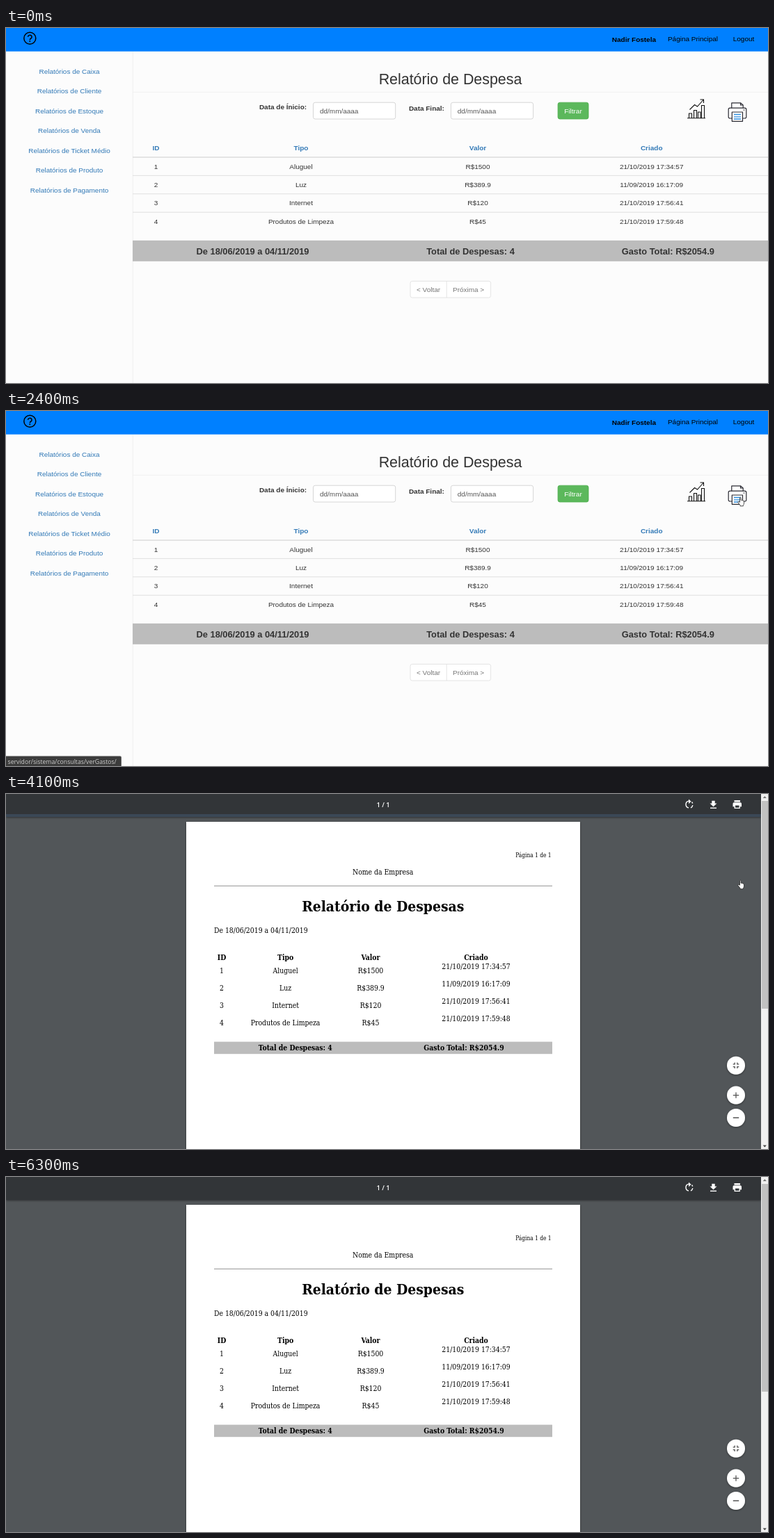
An HTML page for the animation above (6400 ms loop, 1095 px wide and 511 px high).

```html
<!DOCTYPE html>
<html lang="pt-BR">
<head>
<meta charset="utf-8">
<title>Relatório de Despesa</title>
<style>
  html, body { margin: 0; width: 100%; height: 100%; overflow: hidden; background: #fcfcfc; }
  svg { display: block; }
  text { white-space: pre; }
  #app { font: 9.98px "Liberation Sans", Arial, sans-serif; fill: #333; }
  #pdf { font: 10.35px "DejaVu Serif Condensed", "Noto Serif", serif; fill: #000; }
  .ui { font-family: "Open Sans", "Noto Sans", sans-serif; }
  .b { font-weight: bold; }
  .link { fill: #337ab7; }
  .big { font-size: 12.83px; font-weight: bold; }
</style>
</head>
<body>
<svg width="1095" height="511" viewBox="0 0 1095 511">
  <defs>
    <filter id="shade" x="-20%" y="-20%" width="140%" height="140%">
      <feDropShadow dx="0" dy="1" stdDeviation="1.5" flood-opacity=".45"/>
    </filter>
  </defs>

  <g id="app">
    <rect width="1095" height="511" fill="#fcfcfc"/>
    <path d="M182.3 34V511M182 92.3H1095" stroke="#eee" stroke-width=".8"/>
    <rect width="1095" height="33.7" fill="#0080ff"/>
    <circle cx="34.3" cy="14.8" r="8.5" fill="none" stroke="#000" stroke-width="1.5"/>
    <path d="M31.5 12.8a2.8 2.6 0 1 1 4.3 2.2q-1.5 .8-1.5 2.2M34.3 18.3v1.7" fill="none" stroke="#000" stroke-width="1.5"/>

    <g fill="#fff" stroke="#ccc" stroke-width=".8">
      <rect x="441.5" y="107.2" width="118.2" height="23.8" rx="2.8"/>
      <rect x="639.4" y="107.2" width="118.2" height="23.8" rx="2.8"/>
    </g>
    <rect x="793.1" y="107.2" width="43.9" height="23.8" rx="2.8" fill="#5cb85c" stroke="#4cae4c" stroke-width=".8"/>

    <g fill="none" stroke="#111" stroke-width="1.1">
      <path d="M979 129.7H1005M981.5 129.5V123H985.500V129.500M988.500 129.500V118.500H992.500V129.500M994.500 129.500V121H998V129.500M999.500 129.500V111.500H1003.500V129.500"/>
      <path d="M982.500 117.500L989.500 110.500L993.500 113L1002 103.500M997.500 103H1002.500V108"/>
    </g>
    <g fill="#fff" stroke="#2b2b33" stroke-width="1.200" stroke-linejoin="round">
      <path d="M1042.800 116V107.800H1055.500L1059.200 111V116"/>
      <rect x="1038.200" y="115.200" width="25.600" height="14.800" rx="2.200"/>
      <path d="M1043.300 121H1058.500V134.300H1043.300Z"/>
      <path d="M1055.500 108V111H1059M1059.500 118H1061.500" fill="none"/>
    </g>
    <path d="M1046 124.500H1056M1046 127.800H1056M1046 131H1056" stroke="#2f8fe0" stroke-width="1.300"/>

    <path d="M182 186H1095" stroke="#ddd" stroke-width="1.400"/>
    <path d="M182 212.400H1095M182 238.800H1095M182 265.200H1095" stroke="#ddd" stroke-width=".9"/>
    <rect x="182" y="305.800" width="913" height="30" fill="#bcbcbc"/>
    <rect x="581" y="364.400" width="115.600" height="23.700" rx="2.800" fill="#fff" stroke="#ddd" stroke-width=".8"/>
    <path d="M633.200 364.400V388" stroke="#ddd" stroke-width=".8"/>

    <g id="tip" class="ui" display="none">
      <rect x="1043.500" y="133.500" width="51" height="18" fill="#fff" stroke="#888" stroke-width=".7"/>
      <text x="1069" y="145.600" font-size="8.600" text-anchor="middle" fill="#555">Imprimir</text>
    </g>
    <g id="status" class="ui" display="none">
      <rect id="bubble" x="-1" y="497" width="166.500" height="15" rx="1.500" fill="#3c3c3c" stroke="#606060" stroke-width=".8"/>
      <text id="note" x="2.500" y="507.500" font-size="8.700" fill="#ccc"></text>
    </g>
  </g>

  <g id="pdf" display="none">
    <rect width="1085" height="511" fill="#525659"/>
    <rect x="259" y="40" width="566" height="490" fill="#fff" filter="url(#shade)"/>
    <rect width="1085" height="33" fill="#323639" filter="url(#shade)"/>
    <rect id="load" y="29" width="1085" height="4" fill="#3b4856"/>
    <path d="M299 132.300H785" stroke="#777" stroke-width=".8"/>
    <rect x="299" y="356.600" width="486" height="17.600" fill="#bcbcbc"/>

    <g fill="none" stroke="#fff" stroke-width="1.400">
      <path d="M981 19.900A5 5 0 0 1 981 10.100M984 19.900A5 5 0 0 0 986.800 16M986.700 13.500A5 5 0 0 0 985.500 11.500"/>
      <path d="M1012 20.200H1021"/>
    </g>
    <g fill="#fff">
      <path d="M981 7.500L984.600 10.800L981 14Z"/>
      <path d="M1014.300 9.800H1018.700V13.500H1021.500L1016.500 18.300L1011.500 13.500H1014.300Z"/>
      <path d="M1046.500 9H1055V11.600H1046.500ZM1046 12.300H1055.500Q1057 12.300 1057 14V18.300H1054.800V21H1046.600V18.300H1044.500V14Q1044.500 12.300 1046 12.300Z"/>
    </g>
    <path d="M1048 16.500H1053.500V19.700H1048Z" fill="#323639"/>

    <g fill="#fff" filter="url(#shade)">
      <circle cx="1049" cy="390.800" r="13"/>
      <circle cx="1049" cy="433.600" r="13"/>
      <circle cx="1049" cy="466" r="13"/>
    </g>
    <g fill="none" stroke="#555" stroke-width="1.300">
      <path d="M1044.700 388.900H1047.200V386.500M1050.800 386.500V388.900H1053.300M1053.300 392.700H1050.800V395.100M1047.200 395.100V392.700H1044.700"/>
      <path d="M1044.800 433.600H1053.200M1049 429.400V437.800M1044.800 466H1053.200"/>
    </g>

    <rect x="1085" width="10" height="511" fill="#f1f1f1"/>
    <rect x="1086" y="10" width="9" height="299" fill="#c1c1c1"/>
    <path d="M1087.700 6L1090.300 3L1092.900 6Z" fill="#777"/>
    <path d="M1087.700 505.500L1090.300 508.500L1092.900 505.500Z" fill="#444"/>
  </g>

  <g fill="#fff" stroke="#222" stroke-width=".8" stroke-linejoin="round">
    <path id="arrow" display="none" d="M.4 .4V9.400L2.400 7.500L3.800 10.700L5.200 10.100L3.800 7H6.400Z"/>
    <path id="hand" display="none" d="M3.500 8V1.500Q4.300 .2 5.100 1.500V5Q6 4.300 6.600 5.300Q7.600 4.800 8.100 5.800Q9.300 5.500 9.500 6.700V9.500Q9.300 11.500 8.400 12V13.500H4V12.300L.8 8.300Q.9 6.800 2.100 7.200Z"/>
  </g>
</svg>

<script>
const $ = id => document.getElementById(id);
const app = $('app'), pdf = $('pdf');

// y is the optical middle of the capitals
function put(layer, str, x, y, cls = '', opt = {}) {
  const el = document.createElementNS('http://www.w3.org/2000/svg', 'text');
  const { size, anchor = 'middle', ...rest } = opt;
  const px = size || (cls === 'big' ? 12.83 : 10);
  el.setAttribute('x', x);
  el.setAttribute('y', y + px * .358);
  el.setAttribute('class', cls);
  el.setAttribute('text-anchor', anchor);
  if (size) el.style.fontSize = size + 'px';
  Object.assign(el.style, rest);
  el.textContent = str;
  layer.insertBefore(el, layer === app ? $('tip') : null);
}

const heads = ['ID', 'Tipo', 'Valor', 'Criado'];
const rows = [
  ['1', 'Aluguel', 'R$1500', '21/10/2019 17:34:57'],
  ['2', 'Luz', 'R$389.9', '11/09/2019 16:17:09'],
  ['3', 'Internet', 'R$120', '21/10/2019 17:56:41'],
  ['4', 'Produtos de Limpeza', 'R$45', '21/10/2019 17:59:48']
];
const period = 'De 18/06/2019 a 04/11/2019';
const count = 'Total de Despesas: 4', total = 'Gasto Total: R$2054.9';

function buildApp() {
  const black = { fill: '#000' }, field = { anchor: 'start', fill: '#555' }, grey = { fill: '#777' };
  put(app, 'Nadir Fostela', 902.4, 16.3, 'b', black);
  put(app, 'Página Principal', 987, 15.3, '', black);
  put(app, 'Logout', 1060, 15.3, '', black);
  ['Caixa', 'Cliente', 'Estoque', 'Venda', 'Ticket Médio', 'Produto', 'Pagamento']
    .forEach((s, i) => put(app, 'Relatórios de ' + s, 91, 62 + i * 28.53, 'link'));
  put(app, 'Relatório de Despesa', 638.5, 73.5, '', { size: 21.4 });
  put(app, 'Data de Ínicio:', 398, 113.8, 'b');
  put(app, 'Data Final:', 604.4, 115.2, 'b');
  put(app, 'dd/mm/aaaa', 451, 119, '', field);
  put(app, 'dd/mm/aaaa', 648.8, 119, '', field);
  put(app, 'Filtrar', 815, 119, '', { fill: '#fff' });
  const cols = [215.5, 424, 678, 927.7];
  cols.forEach((x, c) => {
    put(app, heads[c], x, 172.5, 'b link');
    rows.forEach((r, i) => put(app, r[c], x, 199.2 + i * 26.35));
  });
  put(app, period, 354.5, 321, 'big');
  put(app, count, 667.5, 321, 'big');
  put(app, total, 951.3, 321, 'big');
  put(app, '< Voltar', 607, 376, '', grey);
  put(app, 'Próxima >', 664.6, 376, '', grey);
}

function buildPdf() {
  put(pdf, '1 / 1', 542, 15.3, 'ui', { size: 9.3, fill: '#fff', fontWeight: 600 });
  put(pdf, 'Página 1 de 1', 783.5, 88, '', { size: 8.3, anchor: 'end' });
  put(pdf, 'Nome da Empresa', 541.7, 112.6);
  put(pdf, 'Relatório de Despesas', 541.7, 161.3, 'b', { size: 20.9 });
  put(pdf, period, 299, 196.6, '', { anchor: 'start' });
  [310, 401.6, 524, 675.5].forEach((x, c) => {
    put(pdf, heads[c], x, 235.5, 'b');
    rows.forEach((r, i) => put(pdf, r[c], x, (c === 3 ? 248 : 254.4) + i * 25.15));
  });
  put(pdf, count, 415.7, 365.6, 'b');
  put(pdf, total, 658, 365.6, 'b');
}

// [time, x, y, pointer]; each pose holds until the next
const path = [
  [900, 97, -7], [1000, 50, 92], [1100, 118, 225], [1200, 300, 322],
  [1300, 520, 362], [1400, 768, 295], [1500, 954, 192],
  [1600, 1012, 167], [1700, 1055, 146], [1800, 1076, 134], [1900, 1073, 129],
  [2000, 1066, 126], [2100, 1060, 125], [2200, 1051, 124, 'hand'], [2400, 1051, 123.3, 'hand'],
  [4500, 1043, 125],
  [4800, 1000, 129], [4900, 890, 135], [5000, 735, 138], [5100, 570, 138],
  [5200, 412, 135], [5300, 265, 131.5], [5400, 132, 104],
  [5500, 52, 45], [5600, 9, 5], [5700, 82, 48], [5800, 240, 142],
  [5900, 410, 245], [6000, 555, 325], [6100, 635, 360], [6200, 67, -5],
  [6300, 0, 0, 'none']
];

// [time, bubble width, text, opacity]
const notes = [
  [2400, 166.5, 'servidor/sistema/consultas/verGastos/', 1],
  [3600, 365, 'Aguardando servidor...', 1],
  [3900, 183, 'Aguardando servidor...', .5],
  [4000, 183, 'Aguardando servidor...', .09]
];

const LOOP = 6400;
const at = (list, t) => list.filter(s => s[0] <= t).pop();
const show = (el, on) => el.setAttribute('display', on ? 'inline' : 'none');

function draw(t) {
  const inPdf = t >= 4100;
  show(app, !inPdf);
  show(pdf, inPdf);
  show($('load'), t < 4200);
  show($('tip'), t >= 2500 && t < 3000);
  $('tip').setAttribute('opacity', t < 2600 ? .5 : 1);

  const note = at(notes, t);
  show($('status'), note);
  if (note) {
    $('bubble').setAttribute('width', note[1]);
    $('note').textContent = note[2];
    $('status').setAttribute('opacity', note[3]);
  }

  const [, x, y, kind = 'arrow'] = at(path, t) || [0, 0, 0, 'none'];
  for (const id of ['arrow', 'hand']) {
    show($(id), id === kind);
    $(id).setAttribute('transform', `translate(${x} ${y})`);
  }
}

buildApp();
buildPdf();
const start = performance.now();
function tick() {
  draw((performance.now() - start) % LOOP);
  requestAnimationFrame(tick);
}
tick();
</script>
</body>
</html>
```
